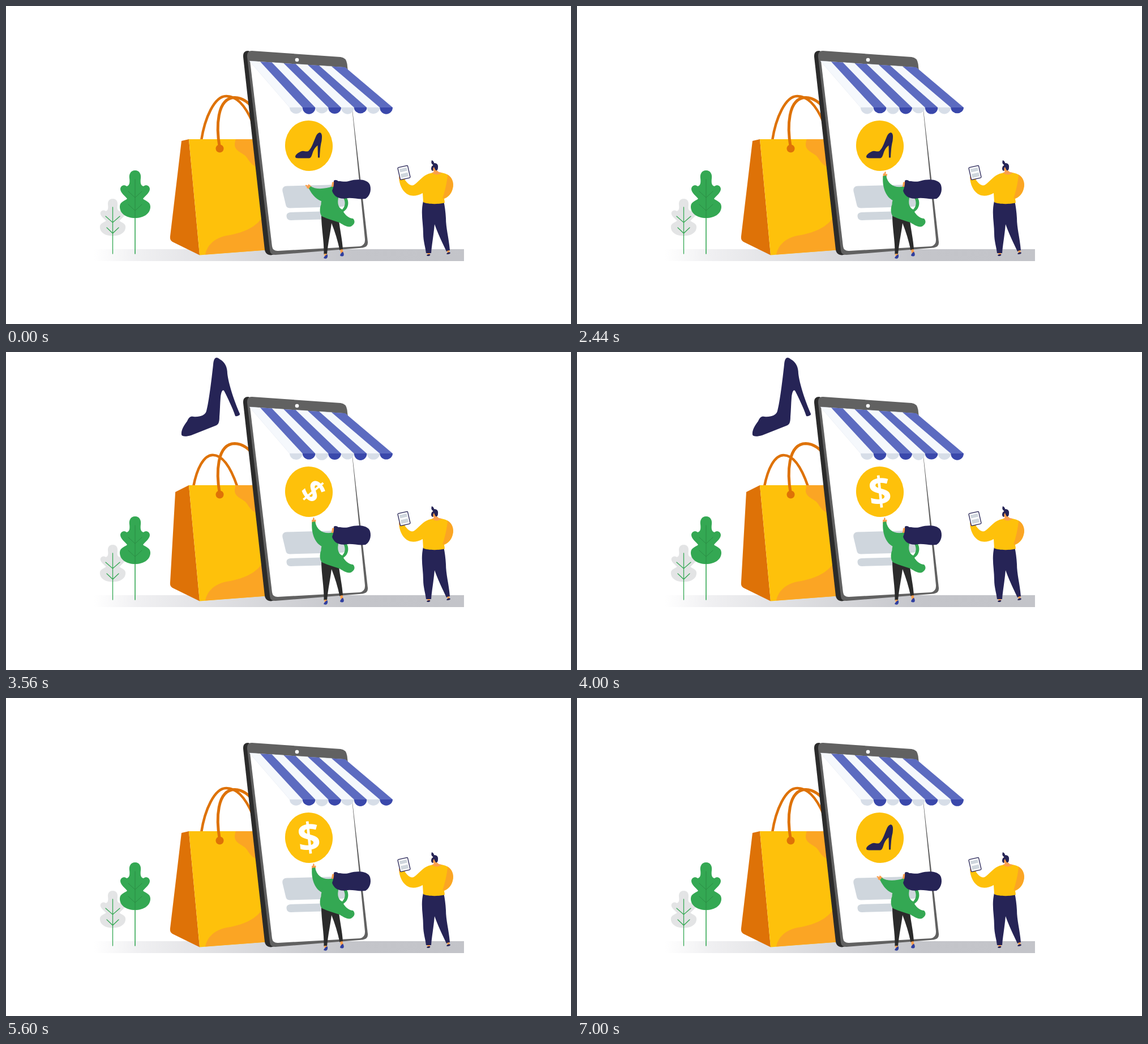
These frames come from a looping animation (998x561 px, 7040 ms). An HTML page:

```html
<!DOCTYPE html>
<html lang="en">
<head>
<meta charset="utf-8">
<title>Online shop</title>
<style>
  html, body { margin: 0; width: 100%; height: 100%; overflow: hidden; background: #fff; }
  svg { display: block; width: 100%; height: 100%; }
  .line { fill: none; stroke-linecap: round; }
  .dollar { font: 700 70px "Open Sans", "Noto Sans", sans-serif; fill: #fff; text-anchor: middle; }
</style>
</head>
<body>
<svg viewBox="0 0 998 561">
  <defs>
    <linearGradient id="floor">
      <stop offset="0" stop-color="#fff"/>
      <stop offset=".12" stop-color="#f0f0f2"/>
      <stop offset=".7" stop-color="#c4c5ca"/>
      <stop offset="1" stop-color="#c3c4c9"/>
    </linearGradient>
    <path id="half" d="M0 0C8 0 11 7 10 14C9 22 10 27 15 28C19 24 26 27 26 33C26 39 18 45 14 50C18 54 27 55 27 64C27 76 16 84 0 84Z"/>
    <g id="leaf"><use href="#half"/><use href="#half" transform="scale(-1 1)"/><path d="M-.5 1H.5V83H-.5Z"/></g>
  </defs>

  <rect x="155" y="429" width="654" height="21" fill="url(#floor)"/>

  <!-- plants -->
  <use href="#leaf" transform="translate(188.5 340) scale(.84 .78)" fill="#e3e4e5"/>
  <path class="line" stroke="#34a853" stroke-width="1.3" d="M188.500 355V437M176 371L188.500 382L201 371M178 391L188.500 401L199 391"/>
  <use href="#leaf" transform="translate(228 290)" fill="#34a853"/>
  <path class="line" stroke="#34a853" stroke-width="1.6" d="M228 372V437"/>
  <path class="line" stroke="#2b8d45" stroke-width="1" d="M228 306V373M216 327L228 338L240 327M216 350L228 361L240 350"/>

  <!-- bag -->
  <path id="backHandle" class="line" stroke="#de7207" stroke-width="4.500"/>
  <path id="bigShoe" fill="#262456" d="M310 146C309 138 314 130 320 122C323 115 326 113 331 114C342 115 352 112 354 104C358 90 363 50 366 22C367 10 371 7 378 13C387 18 391 27 391 38C393 56 403 86 413 109C414 112 407 114 405 113C400 98 391 80 386 70C383 64 380 70 379 80C378 92 378 102 377 114C377 125 375 128 370 130L327 147C317 150 311 149 310 146Z"/>
  <path id="bagSide" fill="#de7207"/>
  <path fill="#fec10b" d="M323 235H445L466 430L342 439.500Z"/>
  <path fill="#fba524" d="M406 235H446L450 286C438 284 431 277 426 268C420 259 406 258 404 246Q404 239 406 235ZM352 438.500C356 420 370 409 390 405C416 401 442 391 453 372L466 430Z"/>
  <path class="line" stroke="#de7207" stroke-width="5" d="M377.500 250C371 214 372 162 404 161.500C420 162 431 172 440 185"/>
  <circle cx="377.500" cy="251.500" r="7" fill="#de7207"/>

  <!-- tablet -->
  <path fill="#2b2b2b" d="M428 79C421 79 418.500 83 419 90L457 430C458 436 462 439.500 468 439.500L480 437L440 85Z"/>
  <path fill="#616161" d="M434 79L591 90Q601 91 602.500 102L639 416Q640 425 630 426.500L476 439Q467 439.500 466 431L426 90Q425 79 434 79Z"/>
  <path fill="#fff" d="M431 97L596 108Q604 109 605 117L634 411Q635 422 625 424L480 432Q471 432 470 424Z"/>
  <circle cx="514" cy="95" r="3.300" fill="#fff"/>
  <g fill="#cfd6dd">
    <path d="M496 317.500L590 315Q597 315 598 322L600 347Q600 353 594 354L502 356.500Q495 357 494 350L488.500 327Q487 318 496 317.500Z"/>
    <path d="M502 364L575 362V376L503 378Q496 378 495.500 371Q495 365 502 364Z"/>
  </g>
  <ellipse cx="535" cy="246.500" rx="42" ry="44.500" transform="rotate(-8 535 246.500)" fill="#fec10b"/>
  <path id="smallShoe" fill="#262456" d="M511 266C511 262 516 259 521 256.500C526 254 529 258 534 256C540 251 543 240 547 231C549 226 553 221.500 556 224C559 227 558 233 557.500 238C555 248 554.500 258 554 267.500H551L550.500 246C546 249 543 254 541 261C539 267 538 268.500 534 268.500L516 268.500Q511 268.500 511 266Z"/>
  <text id="dollar" class="dollar" y="25">$</text>
  <g id="awning"></g>

  <!-- shopper at the screen -->
  <path fill="#2b2b2b" d="M557 369C557 392 562 414 561.500 438H567C569 417 573 400 575 383C581 398 586 414 589.500 431L595 429.500C594 412 590 396 588 378Z"/>
  <path fill="#fb9f4c" d="M562 437H566.500L567 442H563ZM590 430L594.500 429L596 436L592 438Z"/>
  <path fill="#303f9f" d="M561 444.500Q563 440 567.500 438Q569.500 443 566 445.500Q562 446 561 444.500ZM590 440Q591 436 595 433.500Q598 438 596 441Q592 442.500 590 440Z"/>
  <g id="hand">
    <path fill="#fb9f4c" d="M-3 2L-3.500 -3Q-4 -6 -1.700 -5L-1.500 -8Q-.5 -10 .8 -8L1 -4.500L3 -5.500Q4.500 -5 3.500 -2L2.500 2Z"/>
  </g>
  <path id="sleeve" fill="#34a853"/>
  <path fill="#34a853" d="M578 317C567 321 557 336 556.500 350C553 359 555 368 558 371C569 376 580 379 589 382C600 389 607 392 612 387C616 384 617 379 613 375C604 374 599 368 596 363C607 356 606 342 600 336L595 337C600 344 600 353 594 359C587 356 585 348 587 339L583 317Z"/>
  <path fill="#fb9f4c" d="M576 311L582 309V319L575 319Z"/>
  <path fill="#262456" d="M579 308Q583 305.500 587 309C594 309 600 311 607 308.500C622 304 640 306 643 316C646 326 642 336 635 340C623 342 610 337 600 339.500C588 341 579 336 576 326Q580 316 579 308Z"/>

  <!-- shopper with a small tablet -->
  <path fill="#fb9f4c" d="M695 309L694 303Q694 299 698 299L706 303L704 308ZM752 282L761 281V290L768 296L750 297L756 292Q752 289 752 282Z"/>
  <path fill="#262456" d="M737 344C732 366 737 382 737 402C737 415 741 426 742 436H751C752 422 755 407 757 385C763 402 772 420 778 433L784 431C782 408 777 392 777 374Q776 357 773 344Z"/>
  <path fill="#fb9f4c" d="M744 436H749V440H745ZM779 432L783 431L784 436H780Z"/>
  <path fill="#262456" d="M743 439.500Q747 436.500 749.500 438.500Q749 441.500 744 441ZM778 437Q781 433 785 435Q785 438 779 438Z"/>
  <path fill="#fec10b" d="M742 298C752 292 770 292 780 297.500C788 303 791 312 789 322C787 332 780 338 774 340L775 347C765 350 745 350 737 346L736 330C728 335 717 336 711 333C702 329 696 318 694.500 307L703.500 305C708 312 714 318 720 316C727 312 734 302 742 298Z"/>
  <path fill="#fba524" d="M780 297.500C788 302 792 312 789 322C786 333 779 338 771 340C775 328 779 311 780 297.500Z"/>
  <path fill="#fb9f4c" d="M752 294Q761 292 770 294Q761 301 752 294Z"/>
  <path fill="#262456" d="M752 272Q756 274 756 277Q764 277 763 285Q763 291 759 290Q757 287 756 284Q754 285 754.500 290Q754 292 752 290Q750 287 752 283Q755 281 754 280Q750 278 752 272Z"/>
  <g transform="rotate(-13 703 294)">
    <rect x="694" y="283" width="18" height="22" rx="1.500" fill="#fff" stroke="#262456" stroke-width="1.300"/>
    <path fill="#cfd6dd" d="M696.500 286H709.500V292H696.500ZM696.500 295H709.500V302H696.500Z"/>
  </g>
</svg>
<script>
const LOOP = 7040;
const NS = "http://www.w3.org/2000/svg";
const el = id => document.getElementById(id);
const set = (node, name, value) => node.setAttribute(name, value);
const mix = (a, b, k) => a + (b - a) * k;
const smooth = k => k * k * (3 - 2 * k);

// Each key is [time, ...values].
function track(keys, t, ease = smooth) {
  if (t <= keys[0][0]) return keys[0].slice(1);
  for (let i = 1; i < keys.length; i++) {
    const a = keys[i - 1], b = keys[i];
    if (t < b[0]) {
      const k = ease((t - a[0]) / (b[0] - a[0]));
      return a.slice(1).map((v, n) => mix(v, b[n + 1], k));
    }
  }
  return keys[keys.length - 1].slice(1);
}

// Blends two paths that share the same commands.
function blend(from, to, k) {
  const goal = to.match(/[\d.]+/g);
  let i = 0;
  return from.replace(/[\d.]+/g, n => mix(+n, +goal[i++], k).toFixed(2));
}

const paths = {
  handle: ["M345 237C351 198 368 159 389 159C406 159 421 172 436 206",
           "M331 237C337 206 349 182 365 182C383 182 397 205 408 237"],
  side: ["M310 238L323 235L342 439.5L294 416Q289 413 290 406Z",
         "M299 247L323 235L342 439.5L294 416Q289 413 290 406Z"],
  sleeve: ["M578 318C563 323 547 324 538 318L535 322C541 334 550 343 560 345L580 340Z",
           "M578 318C563 322 549 316 546 299L540.5 300C539 317 544 336 558 343L580 340Z"]
};

const keys = {
  bag: [[2940, 0], [3600, 1], [5080, 1], [5520, 0]],
  arm: [[60, 0], [920, 1], [6280, 1], [7000, .05], [LOOP, 0]],
  wrist: [[0, -62], [920, -20], [1060, -18], [1700, 10], [2440, 10], [2800, -4],
          [3560, 2], [6280, 2], [7000, -58], [LOOP, -62]],
  shoe: [[2900, -60, -190, 55], [3520, 0, 0, 0], [4320, 0, 0, 0]],
  fall: [[4320, 0, 0, 0], [4600, 18, 20, -17], [5000, 17, 236, -17]],
  icon: [[2860, 1], [3200, 0], [6160, 0], [6560, 1]],
  dollar: [[3220, 0, 150, 10], [3560, .8, 50, 8], [3840, 1, -6, 0], [5820, 1, -6, 0], [6160, 0, -6, 0]]
};

// Awning stripes and their hanging edges.
const count = 8, left = 501, pitch = 22.75, edgeY = 179;
const tops = [430, 449, 470, 490.5, 512, 533, 553.500, 575, 599];
const topY = x => 97 + (x - 430) * .065;
function add(attrs) {
  const node = document.createElementNS(NS, "path");
  for (const name in attrs) set(node, name, attrs[name]);
  el("awning").append(node);
  return node;
}
const scallops = [];
for (let i = 0; i < count; i++) {
  const a = tops[i], b = tops[i + 1], x = left + i * pitch, blue = i % 2;
  add({
    d: `M${a} ${topY(a)}L${b} ${topY(b)}L${x + pitch} ${edgeY}H${x}Z`,
    fill: blue ? "#5c6bc0" : "#f5f8fc",
    stroke: blue ? "none" : "#dbe1ea", "stroke-width": .4
  });
  scallops.push(add({ fill: blue ? "#3a48ab" : "#d7dee8" }));
}

function draw(t) {
  const [open] = track(keys.bag, t);
  set(el("backHandle"), "d", blend(...paths.handle, open));
  set(el("bagSide"), "d", blend(...paths.side, open));

  const [sx, sy, turn] = t < 4320 ? track(keys.shoe, t) : track(keys.fall, t, k => k ** 1.5);
  set(el("bigShoe"), "transform", `translate(${sx} ${sy}) rotate(${turn} 360 80)`);
  set(el("bigShoe"), "visibility", t > 2920 && t < 5040 ? "visible" : "hidden");

  const [arm] = track(keys.arm, t), [wrist] = track(keys.wrist, t);
  set(el("sleeve"), "d", blend(...paths.sleeve, arm));
  set(el("hand"), "transform",
    `translate(${mix(537, 543.5, arm)} ${mix(320, 301, arm)}) rotate(${wrist})`);

  const [icon] = track(keys.icon, t);
  set(el("smallShoe"), "transform",
    `translate(535 246) rotate(${(icon - 1) * 90}) scale(${icon}) translate(-535 -246)`);
  const [size, spin, shift] = track(keys.dollar, t);
  set(el("dollar"), "transform", `translate(${535 + shift} 245.5) rotate(${spin}) scale(${size})`);

  scallops.forEach((node, i) => {
    const x = left + i * pitch;
    const drop = 11.1 + .8 * Math.sin(t / LOOP * Math.PI * 14 + i * 2.1);
    set(node, "d", `M${x} ${edgeY}H${x + pitch}A${pitch / 2} ${drop} 0 0 1 ${x} ${edgeY}Z`);
  });
}

const start = performance.now();
function tick() {
  draw((performance.now() - start) % LOOP);
  requestAnimationFrame(tick);
}
tick();
</script>
</body>
</html>
```
